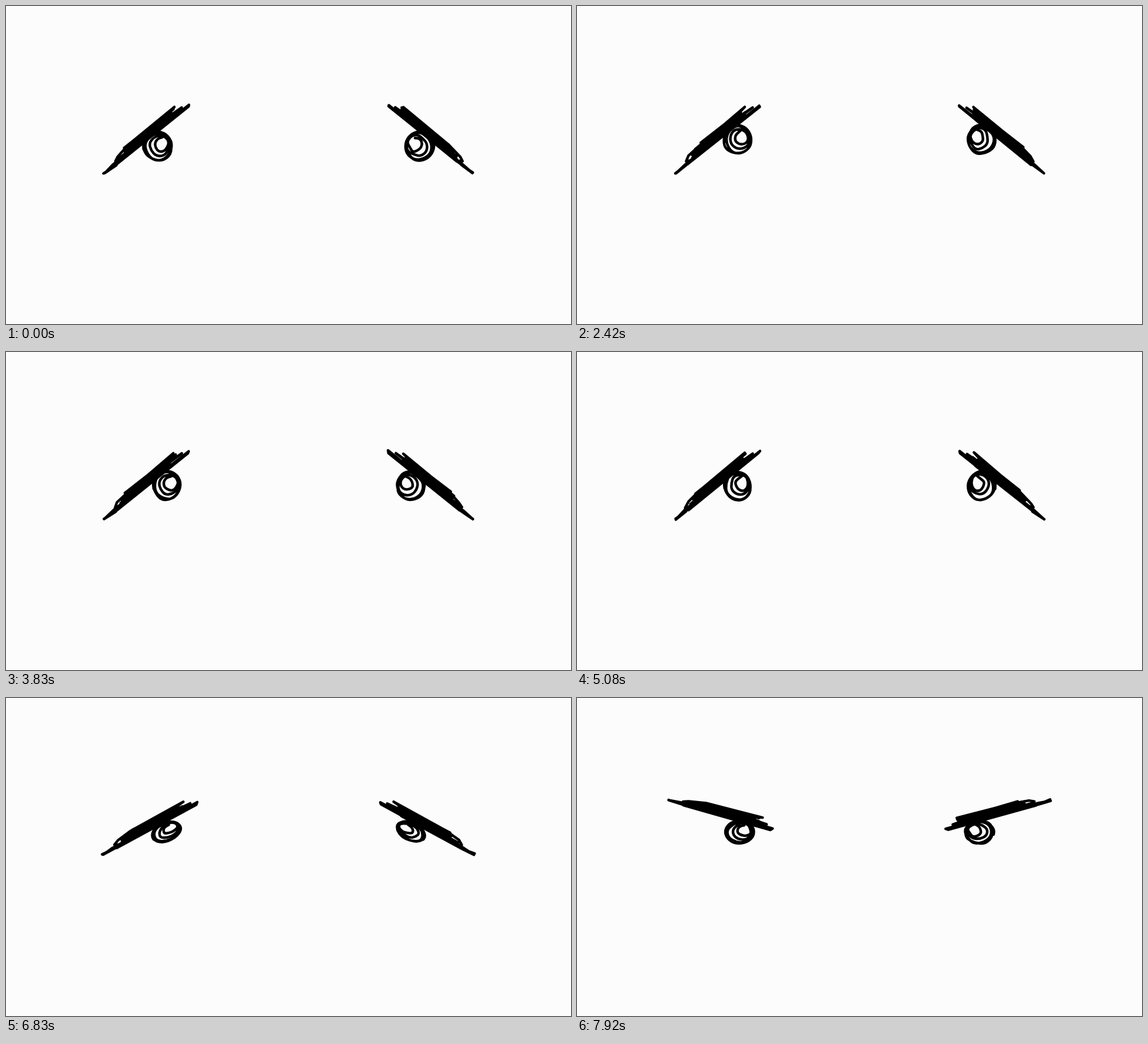
An HTML page with a canvas that plays this animation: 960x540 px, repeating every 8 s.

```html
<!DOCTYPE html>
<html lang="en">
<head>
<meta charset="utf-8">
<title>Scribbled eyes</title>
<style>
  html, body { margin: 0; width: 100%; height: 100%; overflow: hidden; background: #fcfcfc; }
  canvas { display: block; }
</style>
</head>
<body>
<canvas id="stage" width="960" height="540"></canvas>
<script>
const ctx = document.getElementById('stage').getContext('2d');
const LOOP = 8000;
const FPS = 12;

// Each pose builds on the one before it
const frown = { angle: -38.7, browX: 238.5, browY: 226, eyeX: 257, eyeY: 238.5, wide: 1.04, tall: 1.06, tilt: 0 };
const crossed = { ...frown, eyeX: 272.5, eyeY: 227, wide: 1 };
const squint = { ...crossed, angle: -28.4, browX: 244, browY: 221.5, wide: 1.12, tall: 0.66, tilt: -25 };
const startled = { ...squint, angle: 14, browY: 182, eyeX: 274, eyeY: 256, wide: 1.2, tall: 2, tilt: 0 };
const glare = { ...startled, angle: 15.6, browY: 197.5, eyeX: 276, eyeY: 228, wide: 1.04, tall: 0.84 };

const MOVES = [
  { at: 1580, span: 260, to: crossed },
  { at: 5400, span: 400, to: squint },
  { at: 6960, span: 280, to: startled },
  { at: 7500, span: 250, to: glare }
];

const mix = (a, b, p) => a + (b - a) * p;
const clamp = p => Math.max(0, Math.min(1, p));
const ease = p => p * p * (3 - 2 * p);

function poseAt(t) {
  const pose = { ...frown };
  for (const { at, span, to } of MOVES) {
    const p = ease(clamp((t - at) / span));
    for (const key in pose) pose[key] = mix(pose[key], to[key], p);
  }
  return pose;
}

function seeded(seed) {
  return () => {
    seed = seed + 0x6D2B79F5 | 0;
    let n = Math.imul(seed ^ seed >>> 15, 1 | seed);
    n = n + Math.imul(n ^ n >>> 7, 61 | n) ^ n;
    return ((n ^ n >>> 14) >>> 0) / 4294967296;
  };
}

function place(x, y, degrees, sx = 1, sy = 1) {
  const a = degrees * Math.PI / 180, c = Math.cos(a), s = Math.sin(a);
  return ([u, v]) => [x + u * sx * c - v * sy * s, y + u * sx * s + v * sy * c];
}

// One long line through both tips, hatching above it, and a loose loop at the outer end
function browPoints(wobble) {
  const tip = 92, rows = 7;
  const points = [[-tip, 0], [-68, 2], [1 - tip, 1], [-70, -1], [tip, 0], [tip - 2, 2], [-66, 2]];
  for (let i = 0; i < rows; i++) {
    const p = i / (rows - 1), v = mix(2, -11, p);
    points.push([mix(55, 64, p) + wobble(8), v], [mix(-62, -32, p) + wobble(7), v - 1]);
  }
  points.push([80, -5], [20, -6], [71, -13], [-30, -11], [-57, -8 + wobble(2)], [-66, -4], [-58, 0]);
  return points.map(([u, v]) => [u + wobble(1.5), v + wobble(0.9)]);
}

// Nested loops that widen from an off-centre core to a heavy outer ring
function eyePoints(wobble) {
  const perTurn = 9, growing = 2.6, turns = 4.4;
  return Array.from({ length: Math.round(perTurn * turns) }, (_, i) => {
    const turn = i / perTurn, p = Math.min(1, turn / growing);
    const a = -1.6 - turn * Math.PI * 2;
    const r = mix(9.5, 24, p) + wobble(2);
    return [mix(8, 0, p) + r * Math.cos(a), mix(-5, 0, p) + r * Math.sin(a)];
  });
}

function strokeStraight(points) {
  ctx.beginPath();
  points.forEach(p => ctx.lineTo(...p));
  ctx.stroke();
}

function strokeSmooth(points) {
  ctx.beginPath();
  points.slice(1).forEach(([x, y], i) => {
    const [px, py] = points[i];
    ctx.quadraticCurveTo(px, py, (px + x) / 2, (py + y) / 2);
  });
  ctx.stroke();
}

function drawSide(pose, seed) {
  const random = seeded(seed);
  const wobble = size => (random() * 2 - 1) * size;
  const { angle, browX, browY, eyeX, eyeY, wide, tall, tilt } = pose;
  strokeSmooth(eyePoints(wobble).map(place(eyeX, eyeY, tilt, wide, tall)));
  strokeStraight(browPoints(wobble).map(place(browX, browY, angle)));
}

function draw(now) {
  const step = Math.floor(now % LOOP * FPS / 1000 + 0.05) % (LOOP * FPS / 1000);
  const pose = poseAt(step * 1000 / FPS);
  ctx.setTransform(1, 0, 0, 1, 0, 0);
  ctx.fillStyle = '#fcfcfc';
  ctx.fillRect(0, 0, 960, 540);
  ctx.strokeStyle = '#000';
  ctx.lineWidth = 4.4;
  ctx.lineCap = ctx.lineJoin = 'round';
  drawSide(pose, step * 977 + 11);
  ctx.setTransform(-1, 0, 0, 1, 960, 0);
  drawSide(pose, step * 977 + 503);
}

const start = performance.now();
function tick() {
  draw(performance.now() - start);
  requestAnimationFrame(tick);
}
tick();
</script>
</body>
</html>
```
